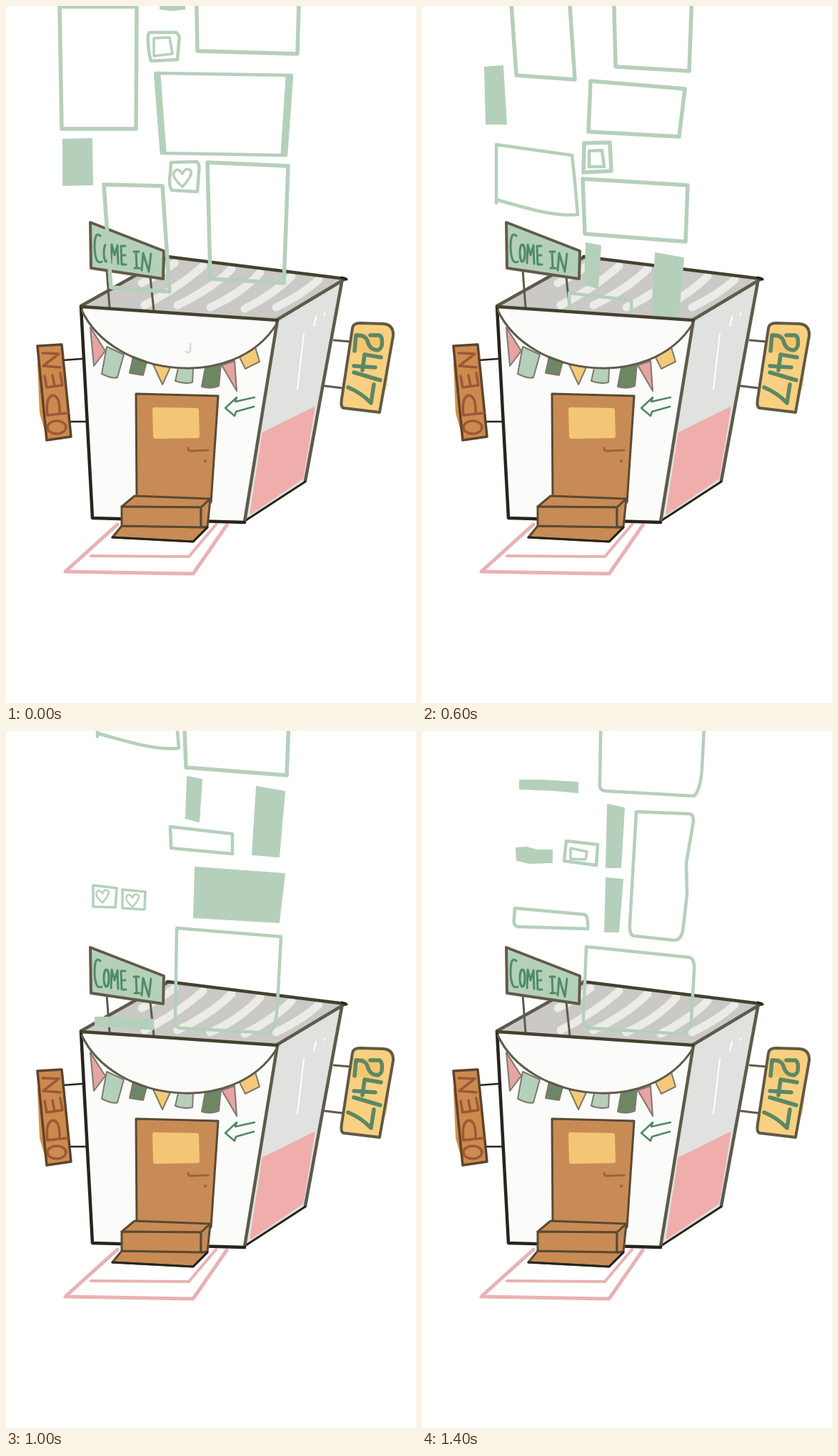
An HTML page that plays this animation: 574x976 px, repeating every 1500 ms.

```html
<!DOCTYPE html>
<html lang="en">
<head>
<meta charset="utf-8">
<title>Come in</title>
<style>
html, body { margin: 0; width: 100%; height: 100%; overflow: hidden; background: #fff; }
svg { display: block; width: 574px; height: 976px; }
svg * { stroke-linejoin: round; stroke-linecap: round; }

.rise, .mark, .from1, .from3, .from5 { animation: rise 1.5s step-end infinite; }
.mark { animation-name: mark; }
.from1 { animation-name: from1; }
.from3 { animation-name: from3; }
.from5 { animation-name: from5; }

@keyframes rise {
  0% { transform: translate(0, 0); }
  6.66% { transform: translate(-12px, -54px); }
  13.33% { transform: translate(-7px, -107px); }
  20% { transform: translate(-7px, -151px); }
  26.66% { transform: translate(-7px, -195px); }
  33.33% { transform: translate(-5px, -246px); }
  40% { transform: translate(-15px, -297px); }
  46.66% { transform: translate(-6px, -348px); }
  53.33% { transform: translate(3px, -400px); }
  60% { transform: translate(6px, -482px); }
  66.66% { transform: translate(9px, -565px); }
  73.33% { transform: translate(13px, -662px); }
  80% { transform: translate(16px, -759px); }
  86.66% { transform: translate(19px, -828px); }
  93.33%, 100% { transform: translate(21px, -897px); }
}
@keyframes mark { 0% { opacity: 1; } 6.66%, 100% { opacity: 0; } }
@keyframes from1 { 0% { opacity: 0; } 6.66%, 100% { opacity: 1; } }
@keyframes from3 { 0% { opacity: 0; } 20%, 100% { opacity: 1; } }
@keyframes from5 { 0% { opacity: 0; } 33.33%, 100% { opacity: 1; } }

.line { fill: none; stroke: #b5d0ba; stroke-width: 5.5; }
.thin { stroke-width: 4.5; }
.fine { stroke-width: 3.5; }
.bar { stroke-width: 9; }
.block { fill: #b5d0ba; stroke: #b5d0ba; stroke-width: 2; }
.ink { fill: none; stroke: #5f5b4b; stroke-width: 3; }
.dark { stroke: #26241c; }
.bold { stroke-width: 4.5; }
.wood { fill: #c98b55; stroke: #5a4a33; stroke-width: 3; }
.text { fill: none; stroke-width: 3; }
.flags { stroke: #7d7a6c; stroke-width: 2; }
.pink { fill: #e8a3a3; }
.mint { fill: #b5d0ba; }
.green { fill: #6b8763; }
.gold { fill: #f5c978; }
</style>
</head>
<body>
<svg viewBox="0 0 574 976">
<defs>
  <clipPath id="above"><path d="M0 0H574V440H380L105 420H0Z"/></clipPath>
  <clipPath id="roof"><path d="M105 421 228 351 474 382 380 440Z"/></clipPath>
  <path id="heart" class="line fine" d="M0 13Q-14 1-12-6Q-8-16 0-5Q5-16 12-9Q14-2 0 13Z"/>
</defs>

<!-- mat -->
<g fill="none" stroke="#e8b2b4">
  <path stroke-width="5" d="M156 726 83 792 262 795 309 727"/>
  <path stroke-width="4" d="M119 770 256 771 294 726"/>
</g>

<!-- roof and side -->
<path fill="#cac9c6" d="M105 421 228 351 476 382 380 440Z"/>
<g clip-path="url(#roof)" fill="none" stroke="#ebece8" stroke-width="11">
  <path d="M190 388Q215 376 236 360M194 419Q242 394 276 364M240 419Q288 396 316 368M286 422Q330 402 356 373M334 424Q374 404 400 378M378 422Q415 404 438 383"/>
</g>
<path fill="#e0e2df" d="M380 440 473 384 419 666 333 722Z"/>
<path fill="#efaeac" stroke="#efaeac" stroke-width="3" d="M360 598 431 563 415 661 343 710Z"/>
<path fill="none" stroke="#fff" stroke-width="2" d="M434 435 431 448M417 459 408 536M446 430V433"/>
<path class="ink bold" d="M105 420 228 351M380 439 475 382M470 387 419 665"/>
<path class="ink bold" style="stroke:#45412f" d="M226 351 475 382"/>
<path class="ink dark" d="M470 380 477 383M419 666 333 722"/>

<!-- picture passing behind the sign -->
<g clip-path="url(#above)"><g class="rise"><g transform="translate(-3 400)">
  <path class="line thin from3" d="M122 173V91L228 106 232 143"/>
  <path class="line thin from5" d="M232 143 236 189Q210 192 165 180T123 168"/>
</g></g></g>

<!-- roof sign -->
<path class="ink" d="M141 370 145 422M202 380 207 427"/>
<path fill="#b5d0ba" stroke="#625b48" stroke-width="4" d="M118 303 221 343 220 382 119 367Z"/>
<g class="text" stroke="#4f8c67" role="img" aria-label="COME IN">
  <path d="M132 322Q124 314 124 338Q125 363 134 358"/>
  <ellipse cx="140.500" cy="346" rx="3.500" ry="12"/>
  <path d="M147 360 148 334 152 349 156 335 157 361M167 336 161 336 162 362 168 362M162 349H167M179 344H186M182 344 183 367M180 367H187M190 370 192 346 200 372 203 347"/>
</g>

<!-- rising pictures -->
<g clip-path="url(#above)"><g class="rise">
  <path class="line" d="M75 1 183 1 182 172 78 172Z"/>
  <path class="block" d="M216-30H250V4L233 6 216 4Z"/>
  <path class="line" d="M266-40 268 63 408 67 411-40Z"/>
  <path class="line thin" d="M201 37 238 37Q244 40 242 50L240 75 203 77Q198 60 199 40Z"/>
  <path class="line fine" d="M207 45 229 44 233 67 207 70Z"/>
  <path class="line thin" d="M209 94 400 97 392 209 218 206Z"/>
  <path class="line bar" d="M212 97 220 203M396 100 389 206"/>
  <path class="block" d="M80 187 120 186 121 250 80 251Z"/>
  <path class="line thin" d="M231 219 267 218Q272 222 270 232L268 260 232 258Q227 250 230 235Z"/>
  <use href="#heart" x="247" y="240"/>
  <path class="line" d="M282 219 395 224 389 388 286 382Z"/>
  <path class="line" d="M137 250 219 252 229 400 147 394Z"/>

  <g class="from1"><g transform="translate(7 195)">
    <path class="block" d="M96 188 121 186 126 267 98 267Z"/>
    <path class="line" d="M244 207 376 218 368 285 241 278Z"/>
    <path class="line" d="M235 294 271 293 273 333 234 335Z"/>
    <path class="line thin" d="M242 305 260 304 263 327 242 327Z"/>
  </g></g>

  <g transform="translate(-3 400)">
    <path class="line" d="M243 139 390 148 387 227 246 216Z"/>
    <path class="block" d="M248 229 268 233 264 292 246 287Z"/>
    <path class="block" d="M345 243 384 250 376 341 339 338Z"/>
    <path class="line thin" d="M224 299 311 309V337L225 329Z"/>
  </g>

  <g transform="translate(-9 565)">
    <path class="block" d="M265 191 390 200 382 268 263 261Z"/>
    <path class="line fine" d="M122 216 155 220 153 247 122 246ZM163 222 195 225 194 250 163 248Z"/>
    <use href="#heart" transform="translate(135 231) scale(.72)"/>
    <use href="#heart" transform="translate(177 237) scale(.72)"/>
  </g>

  <g transform="translate(-16 759)">
    <path class="line thin" d="M246 82 392 94 387 190Q385 220 376 229L252 222Q242 221 244 210Z"/>
    <path class="block" d="M132 207 160 207 213 210V224L180 221 132 219Z"/>
  </g>

  <g transform="translate(-21 897)">
    <path class="block" d="M260 103 283 108 278 191 258 191Z"/>
    <path class="line thin" d="M300 113 375 116Q382 118 379 132L370 185 371 230 365 280Q362 293 353 293L297 287Q290 286 291 270Z"/>
    <path class="block" d="M258 206 281 208 275 281 256 281Z"/>
    <path class="line thin" d="M202 154 246 159 244 188 199 182Z"/>
    <path class="line fine" d="M208 164 231 169 229 180 208 179Z"/>
    <path class="block" d="M132 164 146 163 162 167 182 167V184L150 185 133 181Z"/>
    <path class="line thin" d="M130 248 228 257Q233 260 232 277L134 274Q127 272 129 262Z"/>
    <path class="line thin" d="M230 302 375 317Q382 320 381 335L377 405Q374 424 360 424L235 416Q225 415 226 400Z"/>
  </g>
</g></g>

<!-- front -->
<path fill="#fbfbfa" d="M105 421 380 440 333 722 120 717Z"/>
<path class="mark" fill="none" stroke="#d0e4dc" stroke-width="3" d="M258 473V483Q256 487 252 484"/>
<path class="ink bold" d="M380 440 334 722"/>
<path class="ink dark bold" d="M105 421 121 717 334 723"/>
<path class="ink bold" style="stroke:#45412f" d="M105 421 380 440"/>
<g class="flags">
  <path class="pink" d="M118 450 139 483 123 504Z"/>
  <path class="mint" d="M141 477 165 488 156 520Q150 523 134 515Z"/>
  <path class="green" d="M178 491 197 498 192 517 173 514Z"/>
  <path class="gold" d="M206 502 230 506 219 530Z"/>
  <path class="mint" d="M241 507H262L261 527Q250 530 237 525Z"/>
  <path class="green" d="M279 506 301 501 298 532Q286 537 274 533Z"/>
  <path class="pink" d="M302 503 320 497 323 539Z"/>
  <path class="gold" d="M327 492 349 478 355 498 335 508Z"/>
</g>
<path class="ink" d="M106 426C150 520 320 540 379 445"/>
<path fill="none" stroke="#4f8a63" stroke-width="2.500" d="M348 548 321 554 323 548 307 563 320 574 322 568 347 561"/>

<!-- door and steps -->
<path class="wood" d="M182 543 297 546 287 695 183 690Z"/>
<path fill="#f3c676" stroke="#f3c676" stroke-width="6" d="M208 565 267 566 268 602 209 603Z"/>
<path fill="none" stroke="#9d6337" stroke-width="3" d="M255 619Q254 623 259 623L283 622"/>
<circle cx="279" cy="637" r="2" fill="#9d6337"/>
<g class="wood">
  <path d="M162 701 180 686 286 690 273 702Z"/>
  <path d="M162 728 149 744 262 750 282 730Z"/>
  <path d="M162 701 273 702V730L162 728Z"/>
  <path d="M273 702 286 690 282 729 273 730Z"/>
</g>
<path class="ink dark" d="M149 744 262 750 282 730"/>

<!-- left sign -->
<path class="ink dark" style="stroke-width:2.500" d="M80 496 107 494M91 582 112 582"/>
<path fill="#d3924f" d="M44 500 47 570 58 608 66 500Z"/>
<path fill="#cb8b4f" stroke="#60432a" stroke-width="3.500" d="M44 476 78 474 91 603 57 608Z"/>
<g class="text" stroke="#9f5636" style="stroke-width:3.500" role="img" aria-label="OPEN">
  <ellipse cx="71" cy="590" rx="13" ry="9"/>
  <path d="M86 570 58 573Q55 547 66 545Q76 547 75 571M54 518 57 534 79 531 76 514M68 532 65 517M76 506 52 504 74 487 51 486"/>
</g>

<!-- right sign -->
<path class="ink" d="M459 468 482 470M446 532 471 535"/>
<path fill="#fad79a" d="M540 460 534 530 522 566 505 560Z"/>
<path fill="#f9d081" stroke="#605a45" stroke-width="4" d="M485 451Q486 444 496 444L528 445Q543 446 542 462L523 569 473 563Q468 562 470 550Z"/>
<path fill="#f6c66f" d="M487 458 528 458 524 486 484 484Z"/>
<g class="text" stroke="#5c8765" style="stroke-width:5.500" role="img" aria-label="24/7">
  <path d="M510 461H521Q528 461 526 476Q523 485 513 480Q508 477 506 469Q503 460 490 461L488 483M525 492 502 488 499 510M517 506 487 504M487 513 524 524M515 530 511 556Q498 542 479 534"/>
</g>
</svg>
</body>
</html>
```
